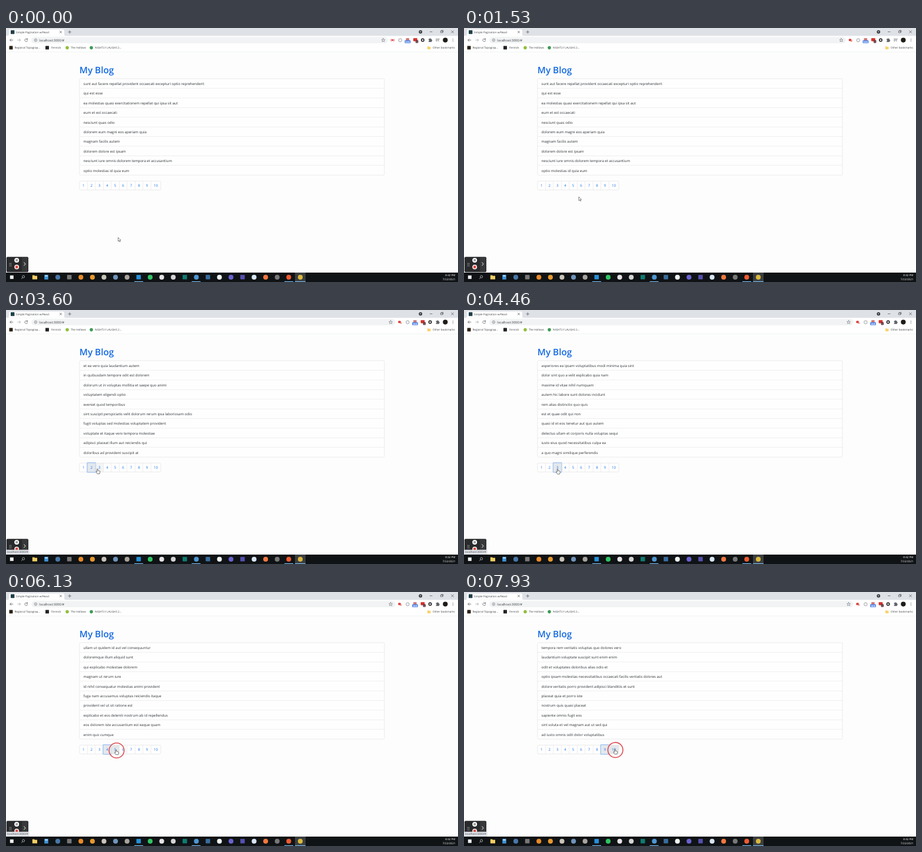
Animation of 768x432 px, one loop 8 s. Source, as an HTML page:

```html
<!DOCTYPE html>
<html lang="en">
<head>
<meta charset="utf-8">
<title>Simple Pagination</title>
<style>
  html, body { margin: 0; width: 100%; height: 100%; overflow: hidden; background: #fdfdfd; }
  svg { display: block; width: 768px; height: 432px; }
  text { font-family: "Open Sans", "Noto Sans", sans-serif; text-rendering: geometricPrecision; white-space: pre; }
  .line { fill: none; stroke-linecap: round; stroke-linejoin: round; }
</style>
</head>
<body>
<svg id="stage" viewBox="0 0 768 432" xmlns="http://www.w3.org/2000/svg"></svg>
<script>
const LOOP = 8000;
const BLUE = '#1268e2', INK = '#2d3135', GREY = '#5f6368', RULE = '#dfdfdf';
const stage = document.getElementById('stage');

function add(tag, attrs, parent = stage) {
  const node = document.createElementNS('http://www.w3.org/2000/svg', tag);
  for (const key in attrs) node.setAttribute(key, attrs[key]);
  return parent.appendChild(node);
}
const group = parent => add('g', {}, parent);
const rect = (x, y, width, height, fill, rx = 0, parent) => add('rect', { x, y, width, height, fill, rx }, parent);
const dot = (cx, cy, r, fill, parent) => add('circle', { cx, cy, r, fill }, parent);
const line = (d, stroke = GREY, width = 0.8, parent) =>
  add('path', { d, stroke, 'stroke-width': width, class: 'line' }, parent);
function label(x, y, size, fill, text, parent, extra = {}) {
  const node = add('text', { x, y, 'font-size': size, fill, ...extra }, parent);
  node.textContent = text;
  return node;
}
const show = (node, on) => node.setAttribute('visibility', on ? 'visible' : 'hidden');

const pages = {
  1: `sunt aut facere repellat provident occaecati excepturi optio reprehenderit
qui est esse
ea molestias quasi exercitationem repellat qui ipsa sit aut
eum et est occaecati
nesciunt quas odio
dolorem eum magni eos aperiam quia
magnam facilis autem
dolorem dolore est ipsam
nesciunt iure omnis dolorem tempora et accusantium
optio molestias id quia eum`,
  2: `et ea vero quia laudantium autem
in quibusdam tempore odit est dolorem
dolorum ut in voluptas mollitia et saepe quo animi
voluptatem eligendi optio
eveniet quod temporibus
sint suscipit perspiciatis velit dolorum rerum ipsa laboriosam odio
fugit voluptas sed molestias voluptatem provident
voluptate et itaque vero tempora molestiae
adipisci placeat illum aut reiciendis qui
doloribus ad provident suscipit at`,
  3: `asperiores ea ipsam voluptatibus modi minima quia sint
dolor sint quo a velit explicabo quia nam
maxime id vitae nihil numquam
autem hic labore sunt dolores incidunt
rem alias distinctio quo quis
est et quae odit qui non
quasi id et eos tenetur aut quo autem
delectus ullam et corporis nulla voluptas sequi
iusto eius quod necessitatibus culpa ea
a quo magni similique perferendis`,
  4: `ullam ut quidem id aut vel consequuntur
doloremque illum aliquid sunt
qui explicabo molestiae dolorem
magnam ut rerum iure
id nihil consequatur molestias animi provident
fuga nam accusamus voluptas reiciendis itaque
provident vel ut sit ratione est
explicabo et eos deleniti nostrum ab id repellendus
eos dolorem iste accusantium est eaque quam
enim quo cumque`,
  5: `non est facere
commodi ullam sint et excepturi error explicabo praesentium voluptas
eligendi iste nostrum consequuntur adipisci praesentium sit beatae perferendis
optio dolor molestias sit
ut numquam possimus omnis eius suscipit laudantium iure
aut quo modi neque nostrum ducimus
quibusdam cumque rem aut deserunt
ut voluptatem illum ea doloribus itaque eos
laborum non sunt aut ut assumenda perspiciatis voluptas
repellendus qui recusandae incidunt voluptates tenetur qui omnis exercitationem`,
  9: `tempora rem veritatis voluptas quo dolores vero
laudantium voluptate suscipit sunt enim enim
odit et voluptates doloribus alias odio et
optio ipsam molestias necessitatibus occaecati facilis veritatis dolores aut
dolore veritatis porro provident adipisci blanditiis et sunt
placeat quia et porro iste
nostrum quis quasi placeat
sapiente omnis fugit eos
sint soluta et vel magnam aut ut sed qui
ad iusto omnis odit dolor voluptatibus`
};

// Browser window
rect(0, 0, 768, 41, '#fff');
rect(0, 0, 768, 13.4, '#dee1e6');
add('path', { d: 'M2 13.4Q5 13.4 5 10.4V5Q5 2.6 7.5 2.6H96.5Q99 2.6 99 5V10.4Q99 13.4 102 13.4Z', fill: '#fff' });
rect(8, 3.8, 6.4, 6.4, '#20404a', 0.6);
label(17, 8.6, 4.6, '#3c4043', 'Simple Pagination w/React');
line('M91.4 5.2L94.6 8.4M94.6 5.2L91.4 8.4');
line('M105.8 6.8H110.6M108.2 4.4V9.2');
dot(704.3, 6.6, 2.9, '#34373b');
add('path', { d: 'M702.9 5.8H705.7L704.3 7.7Z', fill: '#dee1e6' });
line('M720.4 6.5H724M738.8 5H741.8V8H738.8ZM739.8 5V4H742.8V7H741.8M756.7 4.6L760.5 8.4M760.5 4.6L756.7 8.4', '#333', 0.6);
line('M11.8 20.6H6.8M9 18.3L6.7 20.6L9 22.9');
line('M19.6 20.6H24.6M22.4 18.3L24.7 20.6L22.4 22.9', '#aaadb1');
line('M36 19A2.4 2.4 0 1 0 36.6 21.4M36.6 17.8V19.6H34.8');
const pill = rect(43, 15.2, 606, 10.8, '#f1f3f4', 5.4);
add('circle', { cx: 50.4, cy: 20.6, r: 2.3, fill: 'none', stroke: GREY, 'stroke-width': 0.6 });
line('M50.4 20.4V21.7M50.4 19.4V19.45', GREY, 0.6);
label(56.3, 22.5, 5.5, '#3c4043', 'localhost:3000/#');

// Toolbar buttons that slide when the media button leaves
const tools = group();
line('M641 17.7L641.9 19.7L644 19.9L642.4 21.3L642.9 23.3L641 22.2L639.1 23.3L639.6 21.3L638 19.9L640.1 19.7Z', GREY, 0.6, tools);
const live = group(tools);
dot(656.8, 20.6, 1.5, '#df3434', live);
line('M654.5 18.7Q653.3 20.6 654.5 22.5M659.1 18.7Q660.3 20.6 659.1 22.5', '#df3434', 0.8, live);
const cam = group(tools);
rect(653.8, 18.4, 4.4, 3.8, '#d93a35', 1, cam);
dot(658.3, 22, 1.5, '#e98a84', cam);
add('circle', { cx: 669.8, cy: 20.8, r: 2.8, fill: '#f4f4f4', stroke: '#8b8e92', 'stroke-width': 0.8 }, tools);
rect(679.5, 17.3, 5.6, 4.2, '#c9777a', 1, tools);
rect(677.4, 21, 10, 4.8, '#4b7fe5', 0.8, tools);
label(682.4, 24.8, 3.5, '#fff', 'NEW', tools, { 'text-anchor': 'middle', 'font-weight': 700 });
rect(692, 17.2, 6.8, 5.2, '#d2322d', 0.8, tools);
rect(696, 20.8, 4.4, 4.8, '#59333a', 0.8, tools);
label(698.2, 24.5, 3.6, '#fff', '5', tools, { 'text-anchor': 'middle' });
dot(708, 20.6, 3, '#222', tools);
dot(708, 20.6, 1.4, '#fff', tools);
add('path', { d: 'M718 18.6H719.6A1.1 1.1 0 1 1 721.8 18.6H723.2V20.2A1.1 1.1 0 1 1 723.2 22.4V23.8H718V22.2A1 1 0 1 0 718 20.2Z', fill: GREY }, tools);
const media = line('M730.5 18.6H734M730.5 20.4H734M730.5 22.2H732.6M735 22.6V18.6H736.4', GREY, 0.7);
dot(746.4, 20.6, 4.1, '#1e1c19');
for (const y of [18.6, 20.6, 22.6]) dot(759.4, y, 0.6, GREY);

// Bookmarks
rect(5.5, 30.6, 6, 6, '#2a2012', 0.5);
label(14.5, 35.2, 4.6, '#3c4043', 'Regional Topograp...');
rect(67, 30.6, 6, 6, '#222', 0.5);
label(77, 35.2, 4.6, '#3c4043', 'Fennick');
dot(104, 33.6, 2.8, '#8fbf3c');
label(110, 35.2, 4.6, '#3c4043', 'The Hollows');
dot(145, 33.6, 2.8, '#3d9b57');
label(151, 35.2, 4.6, '#3c4043', 'NIGHTLY LAUGHS 2...');
add('path', { d: 'M716 31.2H718.2L719 32H721.4V36.2H716Z', fill: '#f6d36b' });
label(725, 35.2, 4.6, '#3c4043', 'Other bookmarks');
rect(0, 40.6, 768, 0.5, '#e3e5e8');

// Blog list
label(124.8, 76.6, 15.3, BLUE, 'My Blog', stage, { 'font-weight': 600 });
add('rect', { x: 125, y: 86.2, width: 518, height: 164, rx: 1.6, fill: '#fefefe', stroke: RULE, 'stroke-width': 0.6 });
const rows = Array.from({ length: 10 }, (_, i) => {
  const top = 86.2 + i * 16.4;
  if (i) rect(125, top - 0.25, 518, 0.5, RULE);
  return label(131.6, top + 10.7, 6.03, INK, '');
});

// Pagination
const BAR = { top: 260.4, height: 15, left: 125, step: 13.46, right: 263 };
const left = n => BAR.left + (n - 1) * BAR.step;
const right = n => n === 10 ? BAR.right : left(n + 1);
add('rect', { x: BAR.left, y: BAR.top, width: BAR.right - BAR.left, height: BAR.height, rx: 1.6, fill: '#fefefe', stroke: RULE, 'stroke-width': 0.6 });
const hovers = [], halos = [];
for (let n = 1; n <= 10; n++) {
  const w = right(n) - left(n);
  hovers[n] = rect(left(n), BAR.top, w, BAR.height, '#e4e7ea');
  if (n > 1) rect(left(n) - 0.25, BAR.top, 0.5, BAR.height, RULE);
  halos[n] = add('rect', { x: left(n) - 0.5, y: BAR.top - 0.6, width: w + 1, height: BAR.height + 1.2, rx: 0.8, fill: '#e4e8ed', stroke: '#a9c8f0', 'stroke-width': 1.5 });
}
for (let n = 1; n <= 10; n++)
  label((left(n) + right(n)) / 2, 270.1, 6.1, '#2474e4', n, stage, { 'text-anchor': 'middle' });

// Recorder panel
rect(0.8, 389.3, 37.2, 26, '#292a2c', 2);
rect(27, 390.3, 10.2, 24, '#37383a', 1.5);
for (let i = 0; i < 6; i++) dot(6.4 + (i % 2) * 2.2, 400.4 + (i >> 1) * 2.2, 0.6, '#c8c8c8');
dot(18.2, 395, 4, '#fff');
line('M17.2 393.5V396.5M19.2 393.5V396.5', '#333', 0.9);
dot(18.2, 406.5, 4, '#f3e4e4');
rect(16.2, 404.5, 4, 4, '#d8382f', 0.8);
line('M30.7 398.8L33 401.4L30.7 404', '#fff', 1);
const status = group();
rect(0, 407.8, 39.6, 8.4, '#dee1e6', 1, status);
label(1.8, 413.4, 4.6, '#4a4d51', 'localhost:3000/#', status);

// Taskbar
rect(0, 416, 768, 16, '#101315');
rect(491, 416, 18, 16, '#3b3e40');
rect(6.8, 420.8, 6, 6, '#f0f0f0');
add('circle', { cx: 29.6, cy: 423, r: 2, fill: 'none', stroke: '#ddd', 'stroke-width': 0.7 });
line('M28.2 424.5L26.4 426.5', '#ddd', 0.7);
add('path', { d: 'M44.8 420.4H48L49 421.4H53V427.4H44.8Z', fill: '#f3cf62' });
rect(65.2, 419.8, 6.6, 8, '#3d94d8', 0.6);
rect(66.2, 420.8, 4.6, 1.6, '#e8f3fb');
const apps = ['#4777a8', '#777777', '#e88a28', '#e6982f', '#c9c3ba', '#6f93bb', '#a9a39e', '#2590d8',
  '#2fc463', '#e6e3e6', '#d4d4d4', '#0f7b70', '#4d96d2', '#386d9e', '#f0f4f2', '#6863d0',
  '#554fae', '#d7e6f3', '#f07840', '#777777', '#ee5b32', '#d9b83c'];
const square = new Set([1, 7, 11, 13, 16]);
apps.forEach((color, i) => {
  const x = 88 + i * 19.62;
  if (square.has(i)) rect(x - 3.8, 420, 7.6, 7.6, color, 0.8);
  else dot(x, 423.9, 4.1, color);
});
for (const x of [218, 315.5, 473, 491]) rect(x, 430.8, x === 491 ? 18 : 15, 1.2, '#76b9ed');
label(763.5, 422.2, 4.6, '#fff', '8:42 PM', stage, { 'text-anchor': 'end' });
label(763.5, 429.3, 4.6, '#fff', '7/22/2021', stage, { 'text-anchor': 'end' });

// Pointer
const ring = add('circle', { r: 12.8, fill: 'none', stroke: '#dc5056', 'stroke-width': 1.6 });
const pointer = group();
const arrow = add('path', { d: 'M0 0V6.6L1.6 5.2L2.7 7.5L3.7 7L2.6 4.8H4.6Z', fill: '#fff', stroke: '#222', 'stroke-width': 0.55, 'stroke-linejoin': 'round' }, pointer);
const hand = add('path', { d: 'M-.8 .6Q0 -.4 .7 .6V3L3.6 3.6Q4.4 3.9 4.3 4.8L3.6 8.6H-.3L-2.4 5.5Q-2.7 4.5 -1.6 4.6L-.8 5.3Z', fill: '#fff', stroke: '#222', 'stroke-width': 0.6, 'stroke-linejoin': 'round' }, pointer);

// Pointer stops: time, x, y
const path = [
  [0, 190.5, 356.2], [500, 190.5, 356.2], [1530, 195, 287], [1750, 195, 287],
  [2530, 139.2, 266.8], [2760, 145, 268], [3350, 145, 268], [3700, 158, 270.5],
  [4400, 158, 270.5], [4800, 174, 269.5], [5400, 174, 269.5], [5800, 187, 268],
  [6300, 187, 268], [6820, 240, 266.2], [7350, 240, 266.2], [7780, 256.3, 267.2], [8000, 256.3, 267.2]
];
// Clicks: time, page number
const clicks = [[2930, 2], [4130, 3], [5000, 4], [6130, 5], [7070, 9], [7910, 10]];
const RELEASE = 100, FADE = 150;

function pointAt(t) {
  const i = Math.max(1, path.findIndex(stop => stop[0] >= t));
  const [t0, x0, y0] = path[i - 1], [t1, x1, y1] = path[i];
  const u = Math.max(0, (t - t0) / (t1 - t0)), s = u * u * (3 - 2 * u);
  return [x0 + (x1 - x0) * s, y0 + (y1 - y0) * s];
}
function itemAt([x, y]) {
  if (y < BAR.top || y > BAR.top + BAR.height || x < BAR.left || x > BAR.right) return 0;
  return Math.min(10, 1 + Math.floor((x - BAR.left) / BAR.step));
}

let shown = 0;
function setPage(n) {
  if (n === shown) return;
  shown = n;
  pages[n].split('\n').forEach((title, i) => rows[i].textContent = title);
}

function draw(t) {
  const [x, y] = pointAt(t);
  const over = itemAt([x, y]);
  pointer.setAttribute('transform', `translate(${x} ${y})`);
  show(arrow, !over);
  show(hand, over);

  // Hover strength is the share of the fade time spent over each item
  const level = Array(11).fill(0);
  for (let k = 0; k < 15; k++) level[itemAt(pointAt(Math.max(0, t - k * FADE / 15)))] += 1 / 15;
  const done = clicks.filter(c => t >= c[0] + RELEASE).pop();
  const page = done ? done[1] : 1;
  for (let n = 1; n <= 10; n++) {
    hovers[n].setAttribute('opacity', level[n]);
    show(halos[n], done && n === page);
  }
  setPage(page);

  const press = clicks.filter(c => t >= c[0]).pop();
  const age = press ? t - press[0] : 1e4;
  ring.setAttribute('cx', x + 0.9);
  ring.setAttribute('cy', y + 1.5);
  ring.setAttribute('opacity', Math.max(0, Math.min(1, (300 - age) / 120)));

  const narrow = t >= 2000;
  tools.setAttribute('transform', `translate(${narrow ? 12.6 : 0} 0)`);
  pill.setAttribute('width', narrow ? 618.6 : 606);
  show(media, !narrow);
  show(live, t < 700);
  show(cam, t >= 700);
  show(status, t >= 2700);
}

const start = performance.now();
function tick() {
  draw((performance.now() - start) % LOOP);
  requestAnimationFrame(tick);
}
tick();
</script>
</body>
</html>
```
